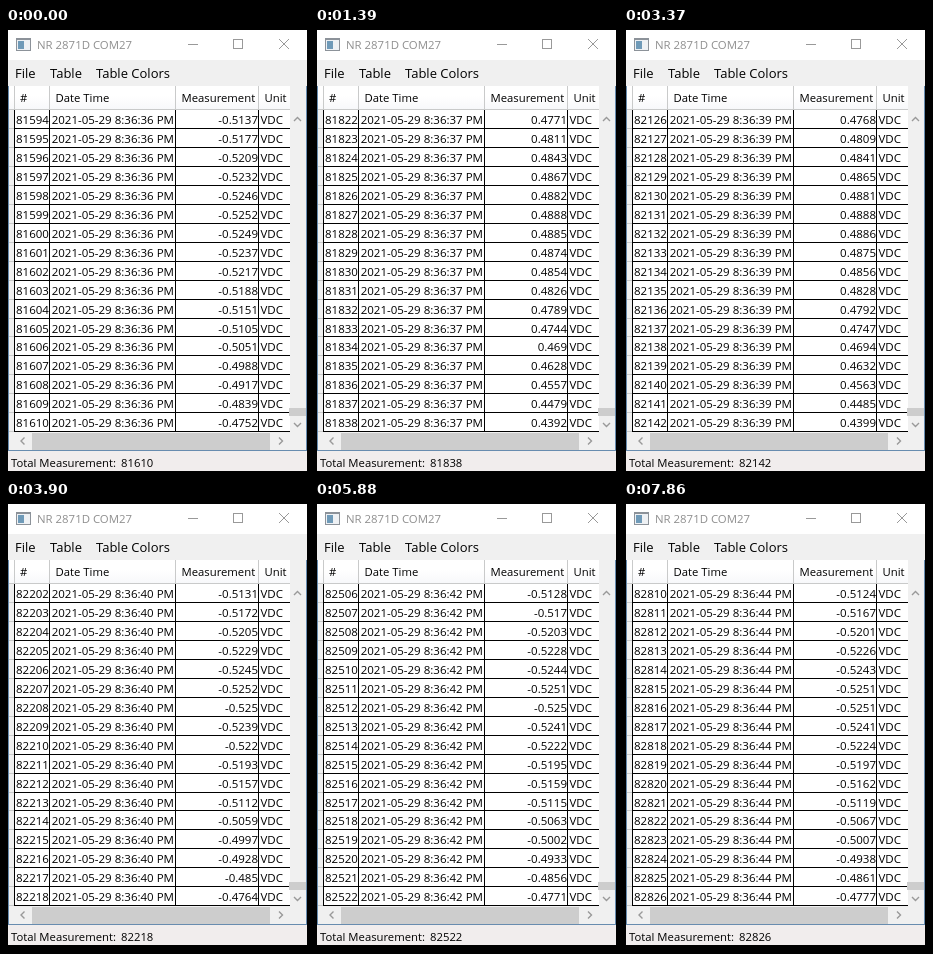
An HTML page for the animation above (8 s loop, 303 px wide and 446 px high).

```html
<!DOCTYPE html>
<html lang="en">
<head>
<meta charset="utf-8">
<title>Measurement log</title>
<style>
  html, body { margin: 0; width: 100%; height: 100%; overflow: hidden; background: #000; }
  svg { display: block; width: 303px; height: 446px; font: 11.5px "Open Sans", "Noto Sans", sans-serif; }
  text { white-space: pre; }
  rect, .crisp { shape-rendering: crispEdges; }
  .end { text-anchor: end; }
  .title { font-size: 11.4px; fill: #8f8f8f; }
  .menu { font-size: 13px; }
  .head { font-size: 11.3px; }
  .status { font-size: 11.3px; }
  .line { fill: none; stroke: #999; }
  .arrow { fill: none; stroke: #999; stroke-width: 1.4; }
</style>
</head>
<body>
<svg viewBox="0 0 303 446">
  <defs>
    <linearGradient id="shade" x2="0" y2="1">
      <stop offset=".4" stop-color="#fff"/>
      <stop offset="1" stop-color="#f7f8fa"/>
    </linearGradient>
  </defs>

  <!-- window -->
  <rect width="303" height="446"/>
  <rect x="2" y="2" width="299" height="441" fill="#fff"/>
  <rect x="10" y="10" width="15" height="13" fill="#8c9299"/>
  <rect x="11" y="12" width="13" height="10" fill="#eef1f4"/>
  <rect x="12" y="13" width="6" height="8" fill="#6f9ab8"/>
  <text class="title" x="31" y="21">NR 2871D COM27</text>
  <path class="line crisp" d="M182 16.5h10M227.5 11.5h9v9h-9z"/>
  <path class="line" d="M273 11l10 10M283 11l-10 10"/>

  <rect x="2" y="32" width="299" height="26" fill="#f0f0f0"/>
  <g class="menu">
    <text x="9" y="50">File</text>
    <text x="44" y="50">Table</text>
    <text x="90" y="50">Table Colors</text>
  </g>

  <!-- grid -->
  <rect x="2" y="58" width="299" height="365" fill="#f0f0f0"/>
  <rect x="8" y="82" width="276" height="322" fill="#fff"/>
  <rect x="3" y="58" width="281" height="24" fill="url(#shade)"/>
  <path class="crisp" stroke="#c9caca" d="M8.5 58v24M43.5 58v24M169.5 58v24M252.5 58v24M3 81.5h281"/>
  <g class="head">
    <text x="14" y="74">#</text>
    <text x="49.5" y="74">Date Time</text>
    <text x="175.5" y="74">Measurement</text>
    <text x="258.5" y="74">Unit</text>
  </g>
  <path class="crisp" stroke="#000" d="M8.5 82v322M43.5 82v322M169.5 82v322M252.5 82v322"/>
  <g id="rows"></g>

  <!-- scroll bars -->
  <rect x="284" y="82" width="16" height="340" fill="#f0f0f0"/>
  <rect x="283" y="380" width="17" height="8" fill="#cdcdcd"/>
  <rect x="8" y="404" width="292" height="18" fill="#f0f0f0"/>
  <rect x="26" y="405" width="238" height="17" fill="#cdcdcd"/>
  <path class="arrow" d="M288 93l3.5-3.5 3.5 3.5M288 395l3.5 3.5 3.5-3.5M18.5 409.5l-3.5 3.5 3.5 3.5M273 409.5l3.5 3.5-3.5 3.5"/>
  <path class="crisp" fill="none" stroke="#688caf" d="M2.5 58v364.5h298V58"/>

  <rect x="2" y="423" width="299" height="20" fill="#f1eded"/>
  <g class="status">
    <text x="5" y="439">Total Measurement:</text>
    <text id="total" x="115" y="439"></text>
  </g>
</svg>
<script>
const LOOP = 8000, ROWS = 17, BATCH = 76;

// Two updates per 990 ms, 460 ms and 530 ms apart.
const stepAt = t => 2 * Math.floor((t + 60) / 990) + ((t + 60) % 990 >= 460 ? 1 : 0);

// One sample in nine batches arrives late.
const totalAt = step => 81610 + BATCH * step - (step % 9 === 5 ? 1 : 0);

// Slow sine in volts, shown to four places without trailing zeros.
const volts = n => Math.round(-182 - 5070 * Math.cos(2 * Math.PI * (n - 81599.16) / 152.035)) / 10000;

const lineY = i => Math.round(81.3 + 18.93 * i);

const grid = document.getElementById("rows");
const total = document.getElementById("total");

function add(tag, attrs, content = "") {
  const el = document.createElementNS("http://www.w3.org/2000/svg", tag);
  for (const key in attrs) el.setAttribute(key, attrs[key]);
  el.textContent = content;
  return grid.appendChild(el);
}

const rows = Array.from({ length: ROWS }, (_, i) => {
  const y = lineY(i) + 15;
  const bottom = lineY(i + 1);
  add("rect", { x: 8, y: bottom, width: 276, height: 1 });
  add("rect", { x: 3, y: bottom, width: 5, height: 1, fill: "#c9caca" });
  add("text", { x: 254.5, y }, "VDC");
  return {
    id: add("text", { x: 10, y }),
    date: add("text", { x: 45.7, y }),
    value: add("text", { x: 252, y, class: "end" })
  };
});

function show(step) {
  const last = totalAt(step);
  const date = `2021-05-29 8:36:${36 + Math.floor(step / 2)} PM`;
  rows.forEach((row, i) => {
    const n = last - ROWS + 1 + i;
    row.id.textContent = n;
    row.date.textContent = date;
    row.value.textContent = volts(n);
  });
  total.textContent = last;
}

let shown = -1;
function tick() {
  const step = stepAt(performance.now() % LOOP);
  if (step !== shown) show(shown = step);
  requestAnimationFrame(tick);
}
tick();
</script>
</body>
</html>
```
